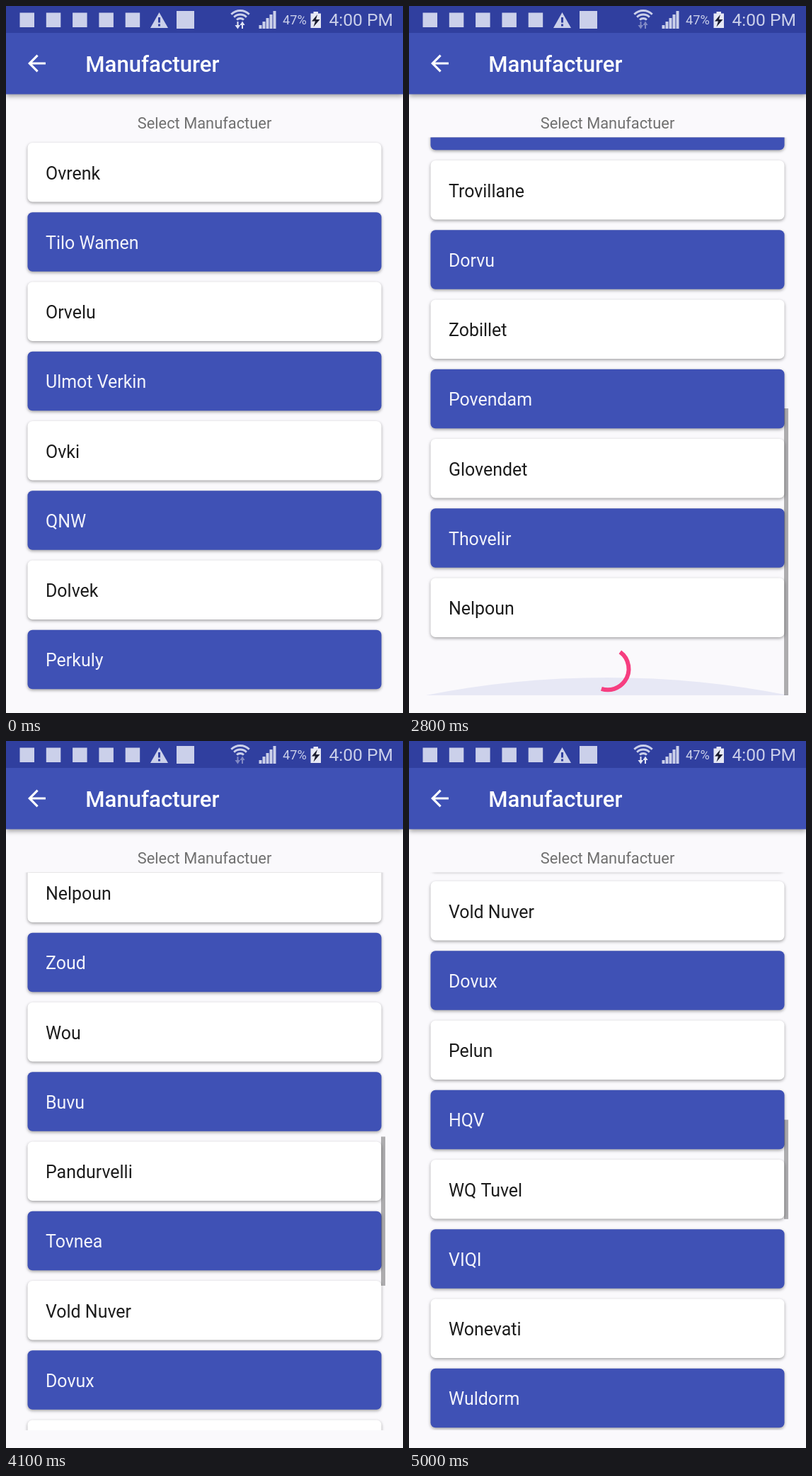
Write an HTML page with a canvas that moves like this. It is 561x998 px and loops after 5100 ms.

```html
<!DOCTYPE html>
<html lang="en">
<head>
<meta charset="utf-8">
<title>Manufacturer list</title>
<style>
html, body { margin: 0; width: 100%; height: 100%; overflow: hidden; background: #faf9fc; }
canvas { display: block; width: 561px; height: 998px; }
</style>
</head>
<body>
<canvas id="stage"></canvas>
<script>
const W = 561, H = 998, LOOP = 5100, STEP = 100;
const BLUE = '#3f51b5', STATUS = '#303f9f', PAPER = '#faf9fc', ICON = '#cbd0ea';
const PITCH = 98.25, CARD_H = 83.5, FIRST_TOP = 193;
const VIEW = { x: 24, top: 185.5, right: 536, bottom: 973 };
const VIEW_H = VIEW.bottom - VIEW.top;
const LOADER_H = 75, PAGE = 15;
const FONT = 'Roboto, sans-serif';

const names = ['Ovrenk', 'Tilo Wamen', 'Orvelu', 'Ulmot Verkin', 'Ovki', 'QNW', 'Dolvek', 'Perkuly',
  'Trovillane', 'Dorvu', 'Zobillet', 'Povendam', 'Glovendet', 'Thovelir', 'Nelpoun',
  'Zoud', 'Wou', 'Buvu', 'Pandurvelli', 'Tovnea', 'Vold Nuver', 'Dovux', 'Pelun', 'HQV',
  'WQ Tuvel', 'VIQI', 'Wonevati', 'Wuldorm'];

// [time, scroll offset]
const scrollPath = [[2100, 0], [2200, 45], [2300, 200], [2400, 380], [2600, 680], [2700, 761],
  [3700, 761], [3800, 844], [3900, 1004], [4000, 1204], [4100, 1396], [4200, 1556],
  [4300, 1678], [4400, 1762], [4500, 1822], [4600, 1868], [4800, 1926], [5000, 1960]];
// Spans during which the next page is loading
const loads = [[2400, 3000], [4400, 5000]];

const canvas = document.getElementById('stage');
const ctx = canvas.getContext('2d');
const dpr = window.devicePixelRatio || 1;
canvas.width = W * dpr;
canvas.height = H * dpr;

const clamp = (v, lo = 0, hi = 1) => Math.min(hi, Math.max(lo, v));

function scrollAt(t) {
  const next = scrollPath.findIndex(([time]) => time > t);
  if (next === 0) return 0;
  if (next < 0) return scrollPath[scrollPath.length - 1][1];
  const [t0, a] = scrollPath[next - 1], [t1, b] = scrollPath[next];
  return a + (b - a) * (t - t0) / (t1 - t0);
}

function rect(x, y, w, h, color) {
  ctx.fillStyle = color;
  ctx.fillRect(x, y, w, h);
}

function text(str, x, y, size, color, weight = 400, align = 'left') {
  ctx.font = `${weight} ${size}px ${FONT}`;
  ctx.textAlign = align;
  ctx.fillStyle = color;
  ctx.fillText(str, x, y);
}

function polygon(points, color) {
  ctx.beginPath();
  points.forEach(([x, y]) => ctx.lineTo(x, y));
  ctx.closePath();
  ctx.fillStyle = color;
  ctx.fill();
}

function arc(x, y, r, from, to, width, color) {
  ctx.beginPath();
  ctx.arc(x, y, r, from * Math.PI / 180, to * Math.PI / 180);
  ctx.lineWidth = width;
  ctx.strokeStyle = color;
  ctx.stroke();
}

function withShadow(alpha, blur, dy, draw) {
  ctx.save();
  ctx.shadowColor = `rgba(0,0,0,${alpha})`;
  ctx.shadowBlur = blur * dpr;
  ctx.shadowOffsetY = dy * dpr;
  draw();
  ctx.restore();
}

function drawCard(index, top) {
  const dark = index % 2 === 1;
  withShadow(0.36, 4, 1.8, () => {
    ctx.beginPath();
    ctx.roundRect(30.5, top, 500, CARD_H, 7);
    ctx.fillStyle = dark ? BLUE : '#fff';
    ctx.fill();
  });
  text(names[index] || '', 56, top + 51.5, 24.95, dark ? '#f2f3fb' : '#1c1c1c');
}

function drawGlow(t) {
  const strength = t < 2700 ? 0 : clamp((3300 - t) / 500);
  if (!strength) return;
  const height = 25 * strength, half = 256;
  const r = (half * half + height * height) / (2 * height);
  ctx.beginPath();
  ctx.arc(280, VIEW.bottom - height + r, r, 0, Math.PI * 2);
  ctx.fillStyle = `rgba(63,81,181,${0.1 * strength})`;
  ctx.fill();
}

function drawScrollbar(t, scroll, rows, atLoader) {
  const alpha = t < 2200 ? 0 : t < 3700 ? clamp((3250 - t) / 250) : t < 3800 ? 0 : 1;
  if (!alpha) return;
  const content = rows * (atLoader ? 95.7 : PITCH);
  const length = VIEW_H * VIEW_H / content;
  const start = Math.min(scroll / content * VIEW_H, VIEW_H - length);
  rect(530, VIEW.top + start, 6, length, `rgba(0,0,0,${0.31 * alpha})`);
}

function drawList(t) {
  const scroll = scrollAt(t);
  const count = PAGE * (1 + loads.filter(([, end]) => t >= end).length);
  const loading = loads.some(([start, end]) => t >= start && t < end);
  const topOf = i => FIRST_TOP + i * PITCH - scroll;
  ctx.save();
  ctx.beginPath();
  ctx.rect(VIEW.x, VIEW.top, VIEW.right - VIEW.x, VIEW_H);
  ctx.clip();
  for (let i = 0; i < Math.min(count, names.length); i++) {
    const top = topOf(i);
    if (top > VIEW.top - PITCH && top < VIEW.bottom + 4) drawCard(i, top);
  }
  const loaderTop = topOf(count) - 7.5;
  const atLoader = loading && loaderTop < VIEW.bottom;
  drawGlow(t);
  if (atLoader) {
    const turn = (t - 2800) * 0.4;
    arc(281, loaderTop + LOADER_H / 2, 29.5, turn - 54, turn + 108, 6, '#f63e80');
  }
  drawScrollbar(t, scroll, count + (loading ? 1 : 0), atLoader);
  ctx.restore();
}

function drawWifi(t) {
  [18, 12.5, 7].forEach(r => arc(331, 24.5, r, -135, -45, 2.8, ICON));
  const active = t < 1900 || t >= 5000 || (t >= 3300 && t < 4000);
  const color = active ? '#e3e6f5' : '#8189c4';
  rect(326.5, 22, 2, 6, color);
  polygon([[323.5, 27], [331, 27], [327.5, 32.5]], color);
  rect(333, 26, 2, 6, color);
  polygon([[330.5, 27], [337.5, 27], [334, 21.5]], color);
}

function drawStatusBar(t) {
  rect(0, 0, W, 38, STATUS);
  for (let i = 0; i < 5; i++) rect(19.5 + i * 37.3, 9.5, 20.5, 20.5, ICON);
  polygon([[216.5, 9], [229, 31], [204, 31]], ICON);
  rect(215, 16, 3, 7.5, STATUS);
  rect(215, 25.5, 3, 3, STATUS);
  rect(241, 7, 25, 25, ICON);
  drawWifi(t);
  for (let i = 0; i < 5; i++) rect(357.5 + i * 5, 27 - i * 5, 4, 5 + i * 5, ICON);
  text('47%', 391, 26, 18.2, ICON);
  rect(434.5, 8, 6.5, 3, '#e6e8f5');
  rect(430.5, 10.5, 14.5, 20.5, '#e6e8f5');
  polygon([[440, 12], [432, 21.5], [437, 21.5], [434.5, 29.5], [443.5, 19], [438, 19]], '#1b1d30');
  text('4:00 PM', 456.5, 28, 24.6, ICON);
}

const backArrow = new Path2D('M20 11H7.83l5.59-5.59L12 4l-8 8 8 8 1.41-1.41L7.83 13H20v-2z');

function drawAppBar() {
  withShadow(0.4, 7, 2, () => rect(0, 38, W, 86.5, BLUE));
  ctx.save();
  ctx.translate(24.8, 62.3);
  ctx.scale(1.558, 1.558);
  ctx.fillStyle = '#fff';
  ctx.fill(backArrow);
  ctx.restore();
  text('Manufacturer', 112.2, 93, 31.2, '#fff', 500);
}

function draw(t) {
  ctx.setTransform(dpr, 0, 0, dpr, 0, 0);
  rect(0, 0, W, H, PAPER);
  text('Select Manufactuer', 280.5, 173, 21.85, '#707070', 400, 'center');
  drawList(t);
  drawAppBar();
  drawStatusBar(t);
}

const startTime = performance.now();
function tick() {
  const t = (performance.now() - startTime) % LOOP;
  draw(Math.floor(t / STEP) * STEP);
  requestAnimationFrame(tick);
}
tick();
</script>
</body>
</html>
```
